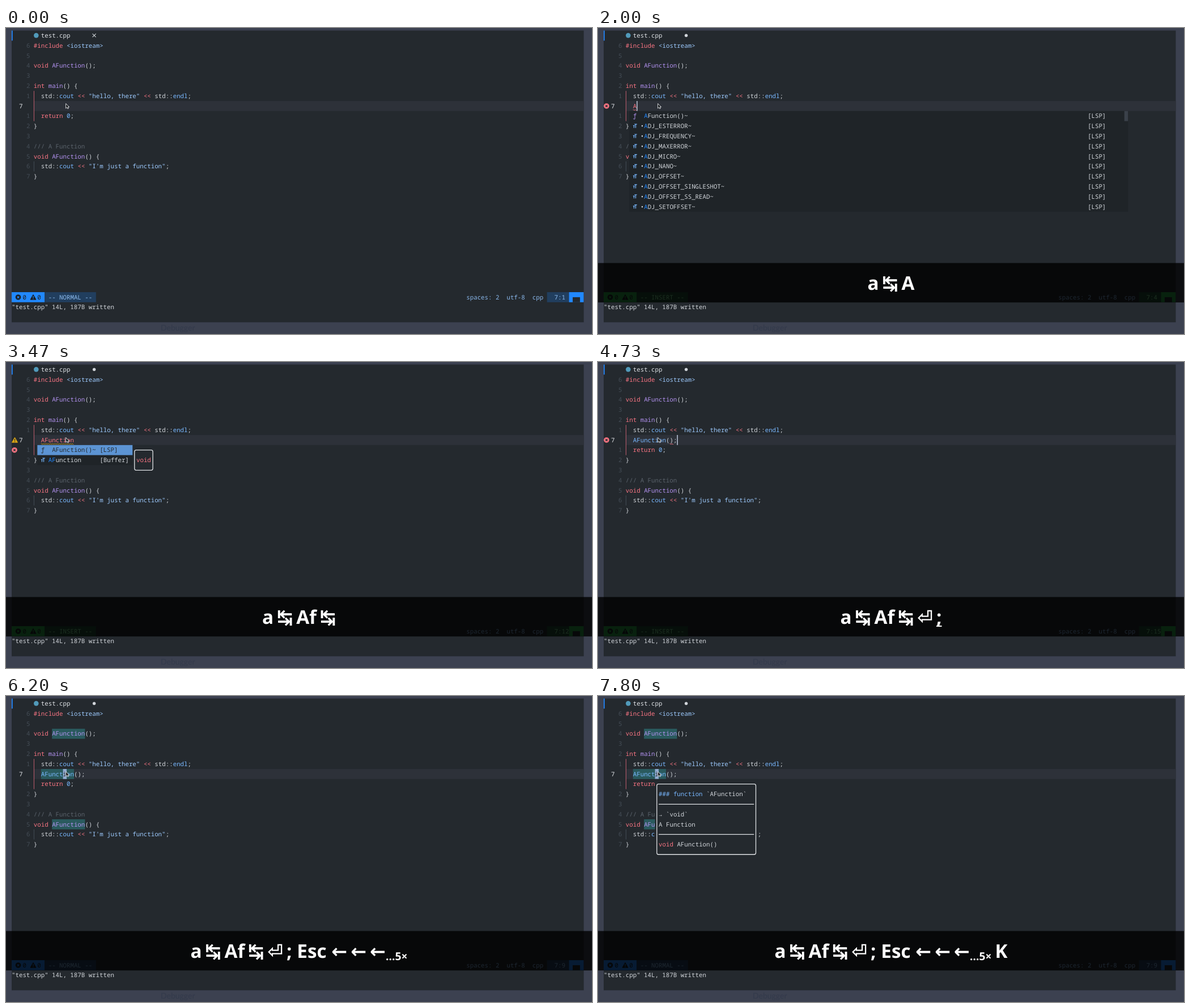
An HTML page for the animation above (8000 ms loop, 1034 px wide and 541 px high).

```html
<!DOCTYPE html>
<html lang="en">
<head>
<meta charset="utf-8">
<title>Code completion</title>
<style>
  html, body { margin: 0; width: 100%; height: 100%; overflow: hidden; background: #3c4150; }
  svg { display: block; width: 1034px; height: 541px; }
  text { white-space: pre; text-rendering: geometricPrecision; }
  .code { font: 10.78px "Noto Sans Mono", "DejaVu Sans Mono", monospace; }
  .key { font: 700 33.3px "Noto Sans", "Open Sans", sans-serif; }
  .sym { font: 700 33.3px "DejaVu Sans", sans-serif; }
  .sub { font: 700 19.3px "Noto Sans", "Open Sans", sans-serif; }
</style>
</head>
<body>
<svg id="stage" viewBox="0 0 1034 541"></svg>
<script>
const LOOP = 8000;
const CELL = 6.47, ROW = 17.79;
const px = col => 10 + col * CELL;
const py = row => 4.5 + row * ROW;

const C = {
  bg: '#24292e', menu: '#1f2428', line: '#2d3139', fg: '#d1d5da', dim: '#444d56',
  red: '#f97583', blue: '#79b8ff', str: '#9ecbff', fn: '#b392f0', note: '#5a626b',
  match: '#2188ff', word: '#2a5a5e', paren: '#2f7478', cursor: '#8fa9cf',
  sel: '#5c94d4', warn: '#d9a514', border: '#dfe2e5'
};

const esc = s => s.replace(/&/g, '&amp;').replace(/</g, '&lt;');
const rect = (x, y, w, h, fill, more = '') =>
  `<rect x="${x}" y="${y}" width="${w}" height="${h}" fill="${fill}" ${more}/>`;
const cells = (col, row, w, h, fill) => rect(px(col), py(row), w * CELL, h * ROW, fill);
const path = (d, stroke, w = 1, fill = 'none') =>
  `<path d="${d}" stroke="${stroke}" stroke-width="${w}" fill="${fill}"/>`;
const text = (col, row, s, fill, more = '') =>
  `<text class="code" x="${px(col)}" y="${py(row) + 12.6}" fill="${fill}" ${more}>${esc(s)}</text>`;

// Runs of [colour, string, attributes] laid side by side
function runs(col, row, list) {
  let out = '';
  for (const [color, s, more] of list) {
    out += text(col, row, s, C[color], more);
    col += s.length;
  }
  return out;
}

const italic = 'font-style="italic"', bold = 'font-weight="700"';
const code = {
  1: [['red', '#include '], ['str', '<iostream>']],
  3: [['red', 'void '], ['fn', 'AFunction'], ['fg', '();']],
  5: [['red', 'int '], ['fn', 'main'], ['fg', '() {']],
  6: [['fg', '  std::'], ['blue', 'cout'], ['red', ' << '], ['str', '"hello, there"'],
      ['red', ' << '], ['fg', 'std::'], ['blue', 'endl'], ['fg', ';']],
  8: [['red', '  return ', italic], ['blue', '0'], ['fg', ';']],
  9: [['fg', '}']],
  11: [['note', '/// A Function', italic]],
  12: [['red', 'void '], ['fn', 'AFunction'], ['fg', '() {']],
  13: [['fg', '  std::'], ['blue', 'cout'], ['red', ' << '],
       ['str', '"I\'m just a function"'], ['fg', ';']],
  14: [['fg', '}']]
};
const macros = ['ESTERROR', 'FREQUENCY', 'MAXERROR', 'MICRO', 'NANO', 'OFFSET',
  'OFFSET_SINGLESHOT', 'OFFSET_SS_READ', 'SETOFFSET'];

function errorIcon(x, y, fill, mark) {
  return `<circle cx="${x}" cy="${y}" r="4.8" fill="${fill}"/>` +
    path(`M${x - 1.8} ${y - 1.8}l3.6 3.6m0 -3.6l-3.6 3.6`, mark, 1.3);
}
function warnIcon(x, y, fill, mark) {
  return path(`M${x} ${y - 4.5}L${x + 5} ${y + 4.2}H${x - 5}Z`, fill, 1, fill) +
    path(`M${x} ${y - 2}v3.2m0 1v1.3`, mark, 1.3);
}
function textIcon(row) {
  const y = py(row) + 5;
  return path(`M64.2 ${y + .6}h4.6m-2.3 0v6.6M61.9 ${y + 2.9}h3.2m-1.6 0v4.3`, C.blue, 1.2);
}
function wave(col, n, color) {
  const y = py(7) + 16;
  return path(`M${px(col)} ${y}` + 'q.8 -1.8 1.6 0t1.6 0'.repeat(Math.round(n * CELL / 3.2)), color, .9);
}
function panel(c1, c2, r1, r2) {
  return cells(c1, r1, c2 - c1 + 1, r2 - r1 + 1, C.bg) +
    rect(px(c1 + .5), py(r1 + .5), (c2 - c1) * CELL, (r2 - r1) * ROW, 'none',
      `rx="3" stroke="${C.border}" stroke-width="1.3"`);
}

function longMenu() {
  let out = cells(7, 8, 136, 10, C.menu) + cells(142, 8, 1, 1, '#3a414a') +
    text(8, 8, 'ƒ', C.fn, italic) + runs(11, 8, [['match', 'A'], ['fg', 'Function()~']]);
  macros.forEach((name, i) => {
    out += textIcon(9 + i) + runs(10, 9 + i, [['fg', '•'], ['match', 'A'], ['fg', `DJ_${name}~`]]);
  });
  for (let r = 8; r < 18; r++) out += text(132, r, '[LSP]', C.fg);
  return out;
}
function shortMenu(picked) {
  const first = picked
    ? cells(7, 8, 26, 1, C.sel) + text(8, 8, 'ƒ', C.bg, italic) + text(11, 8, 'AFunction()~ [LSP]', C.bg)
    : text(8, 8, 'ƒ', C.fn, italic) + runs(11, 8, [['match', 'AF'], ['fg', 'unction()~ [LSP]']]);
  return cells(7, 8, 26, 2, C.menu) + first + textIcon(9) +
    runs(10, 9, [['match', 'AF'], ['fg', 'unction']]) + text(24, 9, '[Buffer]', C.fg);
}
function hover() {
  const rule = r => path(`M${px(15)} ${py(r + .5)}H${px(41)}`, C.border, 1.3);
  return panel(14, 41, 8, 15) +
    runs(15, 9, [['blue', '### function', bold], ['fg', ' `AFunction`']]) + rule(10) +
    text(15, 11, '→ `void`', C.fg) + text(15, 12, 'A Function', C.fg) + rule(13) +
    runs(15, 14, [['red', 'void '], ['fg', 'AFunction()']]);
}

function status(s) {
  const ins = s.mode === 'INSERT';
  const main = ins ? '#28a745' : '#2188ff', side = ins ? '#1f4a30' : '#213e5e';
  const label = ins ? '#85e89d' : '#8fbdf0', ink = '#1b1f23', y = py(26.5);
  return cells(0, 26, 9, 1, main) + errorIcon(21.5, y, ink, main) + text(3, 26, '0', ink) +
    warnIcon(48, y, ink, main) + text(7, 26, '0', ink) +
    cells(9, 26, 14, 1, side) + text(10, 26, `-- ${s.mode} --`, label) +
    text(124, 26, 'spaces: 2', '#8ab8ec') + text(135, 26, 'utf-8', '#8ab8ec') +
    text(142, 26, 'cpp', '#8ab8ec') +
    cells(146, 26, 6, 1, side) + text(148, 26, '7:' + s.pos, label) +
    cells(152, 26, 4, 1, main) + cells(153, 26.5, 2, .5, C.bg);
}

const pen = document.createElement('canvas').getContext('2d');
const fonts = {
  key: '700 33.3px "Noto Sans", "Open Sans", sans-serif',
  sym: '700 33.3px "DejaVu Sans", sans-serif',
  sub: '700 19.3px "Noto Sans", "Open Sans", sans-serif'
};
const GAP = 6;
// Key strokes centred in the band; the newest one may be underlined
function keyBand(s) {
  let x = 0;
  const parts = s.keys.split('|').map(k => {
    const kind = k[0] === '…' ? 'sub' : /[↹⏎←]/.test(k) ? 'sym' : 'key';
    pen.font = fonts[kind];
    const tight = kind === 'sub' || k === 'f';
    if (x && !tight) x += k === 'Esc' || (k === '←' && s.keys.indexOf('Esc|←') >= 0 && !s.seen) ? 8.7 : GAP;
    if (k === '←') s.seen = true;
    const part = { k, kind, x, w: pen.measureText(k).width };
    x += part.w;
    return part;
  });
  s.seen = false;
  const left = 517 - x / 2;
  const base = { key: 463, sym: 463, sub: 467 };
  let out = rect(0, 415.5, 1034, 69.7, '#000', 'opacity=".8"');
  for (const p of parts)
    out += `<text class="${p.kind}" x="${left + p.x}" y="${base[p.kind]}" fill="#fff">${p.k}</text>`;
  if (s.under) {
    const p = parts[parts.length - 1];
    out += rect(left + p.x, { key: 466, sym: 463, sub: 469 }[p.kind], p.w, 2, '#fff');
  }
  return out;
}

function cursorLine(s) {
  const name = s.line.replace(/\W/g, ''), tail = s.line.slice(name.length);
  let out = '';
  for (const c of s.parens) out += cells(c, 7, 1, 1, C.paren);
  out += runs(8, 7, [[tail ? 'blue' : 'red', name], ['fg', tail]]);
  if (s.wave) out += wave(s.wave === 'tail' ? 18 : 8, s.wave === 'tail' ? 1 : name.length,
    s.wave === 'warn' ? C.warn : C.red);
  if (s.blink) {
    if (s.mode === 'INSERT') out += rect(px(s.at), py(7), 1.4, ROW, '#c8d3e6');
    else out += cells(s.at, 7, 1, 1, C.cursor) + text(s.at, 7, s.line[s.at - 8] || '', C.bg);
  }
  return out;
}

function draw(s) {
  let out = rect(10, 4.5, 1009.5, 515.8, C.bg) +
    '<text x="273" y="535" font-size="14" font-family="Lato, sans-serif" fill="#333a4b">Debugger</text>' +
    rect(10, 4.5, 1.7, ROW, '#2188ff') + '<circle cx="53.3" cy="13.1" r="4.3" fill="#519aba"/>' +
    text(8, 0, 'test.cpp', '#e1e4e8', italic + ' ' + bold);
  out += s.dirty ? '<circle cx="155.6" cy="13.2" r="2.7" fill="#d1d5da"/>'
    : path('M152.6 10.1l6 6m0 -6l-6 6', C.fg, 1.1);
  out += cells(6, 7, 150, 1, C.line);
  for (let r = 1; r < 15; r++)
    out += r === 7 ? text(2, 7, '7', '#e1e4e8') : text(4, r, String(Math.abs(r - 7)), C.dim);
  if (s.words) for (const [c, r] of [[11, 3], [8, 7], [11, 12]]) out += cells(c, r, 9, 1, C.word);
  out += path(`M49.4 ${py(6)}V${py(9)}`, '#c0606e', 1) + path(`M49.4 ${py(13)}V${py(14)}`, C.dim, 1);
  for (const r in code) out += runs(6, +r, code[r]);
  out += cursorLine(s);
  if (s.sign7 === 'error') out += errorIcon(15, py(7.5), C.red, C.bg);
  if (s.sign7 === 'warn') out += warnIcon(15.5, py(7.5), C.warn, C.bg);
  if (s.sign8) out += errorIcon(15, py(8.5), C.red, C.bg);
  if (s.menu === 'long') out += longMenu();
  if (s.menu === 'short') out += shortMenu(false);
  if (s.menu === 'picked') out += shortMenu(true);
  if (s.type) out += panel(33, 38, 8, 10) + text(34, 9, 'void', C.red);
  if (s.hover) out += hover();
  out += path('M105.6 133.6v8.4l2 -1.7l1.3 2.5l1.4 -.7l-1.2 -2.4h2.5z', '#e8eaed', .9, '#16191c');
  out += status(s) + text(0, 27, '"test.cpp" 14L, 187B written', C.fg);
  if (s.keys) out += keyBand(s);
  return out;
}

const typed = 'a|↹|A|f|↹|⏎|;|Esc';
const off = { under: false };
const steps = [
  [0, { mode: 'NORMAL', pos: 1, line: '', at: 6, parens: [], keys: '', blink: false }],
  [400, { mode: 'INSERT', keys: 'a', under: true, blink: true }],
  [600, off],
  [800, { keys: 'a|↹', under: true, dirty: true, at: 8, pos: 3 }],
  [1000, off],
  [1600, { keys: 'a|↹|A', under: true, line: 'A', at: 9, pos: 4 }],
  [2000, { under: false, menu: 'long', sign7: 'error', wave: 'error' }],
  [2270, { keys: 'a|↹|A|f', under: true, line: 'Af', at: 10, pos: 5, menu: 'short' }],
  [2470, off],
  [2870, { keys: 'a|↹|A|f|↹', under: true, line: 'AFunction', at: 17, pos: 12, menu: 'picked' }],
  [2930, { type: true }],
  [3130, { under: false, sign7: 'warn', sign8: true, wave: 'warn' }],
  [3470, { blink: false }],
  [3870, { keys: 'a|↹|A|f|↹|⏎', under: true, line: 'AFunction()', at: 19, pos: 14, blink: true,
           menu: '', type: false, wave: '', parens: [17, 18] }],
  [4000, { sign7: 'error', sign8: false, wave: 'tail' }],
  [4130, off],
  [4470, { blink: false }],
  [4730, { keys: 'a|↹|A|f|↹|⏎|;', under: true, line: 'AFunction();', at: 20, pos: 15,
           blink: true, parens: [] }],
  [4800, { sign7: '', wave: '' }],
  [4930, off],
  [5000, { keys: typed, under: true, mode: 'NORMAL', at: 19, pos: 14 }],
  [5200, off],
  [5330, { keys: typed + '|←', under: true, at: 18, pos: 13, parens: [17] }],
  [5470, off],
  [5600, { keys: typed + '|←|←', under: true, at: 17, pos: 12, parens: [18] }],
  [5670, { keys: typed + '|←|←|←', at: 16, pos: 11, parens: [] }],
  [5800, { keys: typed + '|←|←|←|…4×', at: 15, pos: 10, words: true }],
  [5870, { keys: typed + '|←|←|←|…5×', at: 14, pos: 9, words: false }],
  [6070, { words: true }],
  [6200, off],
  [6400, { keys: typed + '|←|←|←|…5×|K', under: true }],
  [6470, { hover: true }],
  [6600, off],
  [7270, { blink: false }],
  [7800, { blink: true }]
];
let state = {};
const scenes = steps.map(([time, change]) => ({ time, ...(state = { ...state, ...change }) }));

const stage = document.getElementById('stage');
const start = performance.now();
let shown = null;
function tick() {
  const t = (performance.now() - start) % LOOP;
  const scene = scenes.filter(s => s.time <= t).pop();
  if (scene !== shown) stage.innerHTML = draw(shown = scene);
  requestAnimationFrame(tick);
}
tick();
</script>
</body>
</html>
```
